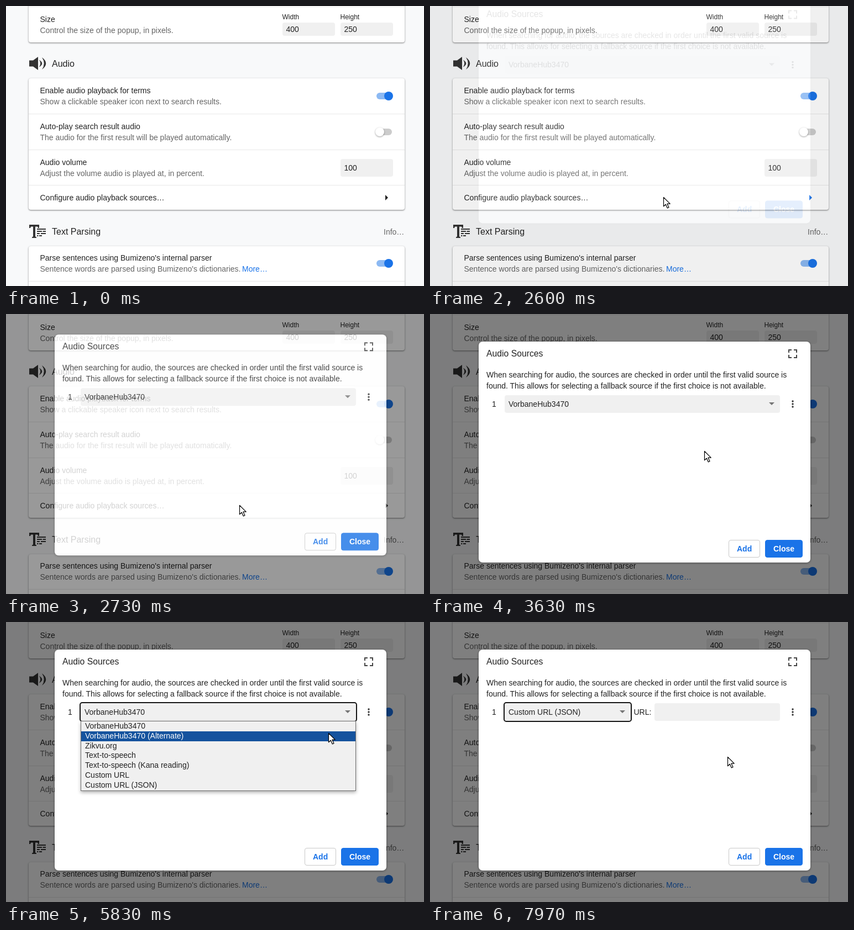
Recreate the animation shown at these times as an HTML page. Size 756 by 507 pixels, loop 8 s.

```html
<!DOCTYPE html>
<html lang="en">
<head>
<meta charset="utf-8">
<title>Audio settings</title>
<style>
html, body { margin: 0; width: 100%; height: 100%; overflow: hidden; background: #f8f9fa; }
body { position: relative; font: 14px/20px "Liberation Sans", Arial, sans-serif; color: #222; }
div, span, svg { position: absolute; box-sizing: border-box; }
.layer, svg.layer { left: 0; top: 0; width: 756px; height: 507px; overflow: hidden; }
span { white-space: pre; }
.soft { color: #666; }
.link { color: #1a73e8; }
.small { font-size: 12px; line-height: 22px; }
.head { font-size: 16px; line-height: 19px; }
.title { font-size: 15.75px; line-height: 19px; }
.bold { font-weight: bold; color: #1a73e8; }
.white { color: #fff; }
.card { background: #fff; border-radius: 4px; box-shadow: 0 1px 2px rgba(0,0,0,.35), 0 1px 3px 1px rgba(0,0,0,.13); }
.line { background: #e8e8e8; }
.field { background: #f0f0f0; border-radius: 4px; }
.track { border-radius: 6px; background: #ccc; }
.knob { border-radius: 50%; background: #fff; box-shadow: 0 1px 3px rgba(0,0,0,.4); }
.on.track { background: #8cb9f3; }
.on.knob { background: #1a73e8; box-shadow: none; }
.ring { border: 2px solid #151515; border-radius: 5px; }
.panel { background: #fff; border-radius: 7px; box-shadow: 0 1px 4px rgba(0,0,0,.4); }
.button { border: 1px solid #c8c8c8; border-radius: 4px; }
.main { background: #1a73e8; border-color: #1a73e8; }
.popup { background: #f0f0f0; border: 1px solid #6e6e6e; box-shadow: 0 3px 6px rgba(0,0,0,.3); }

#modal, #dialog, #wide, #narrow, #list, #hot, #chevron, #cursor, #arrow, #hand { animation: 8s linear infinite; }
#modal { background: rgba(0,0,0,.5); animation-name: fade; }
#dialog { overflow: visible; animation-name: drop; }
#chevron { fill: #222; animation-name: tint; }
#wide, #narrow, #list, #hot, #arrow, #hand { animation-timing-function: step-end; }
#wide { animation-name: wide; }
#narrow { animation-name: narrow; }
#list { animation-name: list; }
#hot { background: #15539e; color: #fff; animation-name: hot; }
#cursor { left: 0; top: 0; width: 1px; height: 1px; animation-name: move; }
#cursor svg { left: 0; top: 0; width: 20px; height: 22px; overflow: visible; }
#arrow { animation-name: arrow; }
#hand { animation-name: hand; }

@keyframes fade {
  0%, 31.75% { opacity: 0; animation-timing-function: cubic-bezier(.35,0,.35,1); }
  35.875%, 100% { opacity: 1; }
}
@keyframes drop {
  0%, 31.75% { transform: translateY(-64px); animation-timing-function: cubic-bezier(.35,0,.35,1); }
  35.875%, 100% { transform: none; }
}
@keyframes tint {
  0%, 14.7% { fill: #222; }
  16.5%, 32.55% { fill: #1a73e8; }
  33.8%, 100% { fill: #222; }
}
@keyframes wide { 0% { visibility: visible; } 92.84%, 100% { visibility: hidden; } }
@keyframes narrow { 0% { visibility: hidden; } 92.84%, 100% { visibility: visible; } }
@keyframes list { 0% { visibility: hidden; } 62.45% { visibility: visible; } 92.84%, 100% { visibility: hidden; } }
@keyframes hot {
  0% { clip-path: inset(180px 124px 309px 136px); }
  71.7% { clip-path: inset(198px 124px 291px 136px); }
  76.1% { clip-path: inset(216px 124px 274px 136px); }
  80.33%, 100% { clip-path: inset(287px 124px 202px 136px); }
}
@keyframes arrow {
  0% { visibility: hidden; }
  5.34% { visibility: visible; }
  14.55% { visibility: hidden; }
  29.96%, 100% { visibility: visible; }
}
@keyframes hand { 0% { visibility: hidden; } 14.55% { visibility: visible; } 29.96%, 100% { visibility: hidden; } }
@keyframes move {
  0%, 5.3% { transform: translate(748px, 58px); animation-timing-function: cubic-bezier(.2,.3,.5,1); }
  10.8%, 14.54% { transform: translate(516px, 175px); }
  14.55%, 14.65% { transform: translate(464px, 331px); animation-timing-function: ease-out; }
  17.5% { transform: translate(441px, 354px); }
  19.6%, 21.25% { transform: translate(434px, 351px); }
  24% { transform: translate(427px, 339px); }
  26.6%, 40.5% { transform: translate(422px, 346px); animation-timing-function: ease-in-out; }
  45.3%, 47.5% { transform: translate(496px, 248px); animation-timing-function: ease-out; }
  49.1%, 50.5% { transform: translate(588px, 155px); animation-timing-function: ease-out; }
  55.3%, 68.75% { transform: translate(620px, 157px); animation-timing-function: ease-in-out; }
  72.8%, 75% { transform: translate(583px, 201px); }
  76.6%, 80.32% { transform: translate(581px, 224px); }
  80.33%, 84.25% { transform: translate(521px, 285px); }
  88.7%, 95.5% { transform: translate(518px, 290px); animation-timing-function: ease-in-out; }
  99.6%, 100% { transform: translate(538px, 244px); }
}
</style>
</head>
<body>
<div id="page" class="layer"></div>
<svg class="layer" viewBox="0 0 756 507" fill="#333">
  <path d="M42 98.5h7l9-6.5v24l-9-6.5h-7z"/>
  <path d="M60 97.5q10.500 6.500 0 13q4.500-6.500 0-13z"/>
  <path d="M65 93q14.500 11 0 22q7.500-11 0-22z"/>
  <path d="M42 396h18v6h-2l-1-2.500h-4v18l2 1v1.500h-8v-1.500l2-1v-18h-4l-1 2.500h-2z"/>
  <path d="M56 404h16M56 408h9m1.500 0h5.500M56 412h5m2 0h9M56 416h2.500m1.500 0h5" stroke="#333" stroke-width="1.800"/>
  <path id="chevron" d="M686 342l5 5-5 5z"/>
</svg>
<div id="modal" class="layer">
  <div id="dialog" class="layer">
    <div id="base" class="layer"></div>
    <div id="wide" class="layer"></div>
    <div id="narrow" class="layer"></div>
    <svg class="layer" viewBox="0 0 756 507" fill="#333">
      <path d="M649 70v-5h5m4 0h5v5m0 4v5h-5m-4 0h-5v-5" fill="none" stroke="#444" stroke-width="2"/>
      <circle cx="656" cy="158" r="1.700"/><circle cx="656" cy="163" r="1.700"/><circle cx="656" cy="168" r="1.700"/>
    </svg>
  </div>
</div>
<div id="list" class="layer"></div>
<div id="hotwrap" class="layer"></div>
<div id="cursor">
  <svg id="arrow"><path d="M.5.5v16.300l3.800-3.600 3 6.700 2.700-1.200-3-6.500h5.200z" fill="#fff" stroke="#000" stroke-width="1.200" stroke-linejoin="round"/></svg>
  <svg id="hand">
    <path d="M-.5 10V1.800Q-.5.500 .9.500T2.300 1.800V6q1.200-1 2.500.2 1.300-.9 2.500.4 1.800-.6 2.800 1.200V12q0 2-1.300 3.500v1.500H-.8v-1.300L-4.200 10.500Q-5 9-3.800 8.200-2.500 7.700-.5 10z" fill="#fff" stroke="#000" stroke-width="1.200" stroke-linejoin="round"/>
    <path d="M1.500 9.500v1m2.500-1v1m2.500-1v1" stroke="#000"/>
  </svg>
</div>
<script>
const $ = id => document.getElementById(id);

function add(parent, tag, cls, x, y) {
  const el = document.createElement(tag);
  el.className = cls;
  el.style.left = x + 'px';
  el.style.top = y + 'px';
  parent.append(el);
  return el;
}

// y is the baseline; every text class puts it 15px below the top
function text(parent, x, y, str, cls = '') {
  add(parent, 'span', cls, x, y - 15).textContent = str;
}

function box(parent, x, y, w, h, cls) {
  const el = add(parent, 'div', cls, x, y);
  el.style.width = w + 'px';
  el.style.height = h + 'px';
}

function row(y, title, note) {
  text(page, 61.5, y, title);
  if (note) text(page, 61.5, y + 20, note, 'soft');
}

function toggle(y, on) {
  const cls = on ? ' on' : '';
  box(page, 670, y - 6, 28, 12, 'track' + cls);
  box(page, on ? 684 : 668, y - 8, 16, 16, 'knob' + cls);
}

function select(parent, w, value) {
  box(parent, 135, 147, w, 32, 'field');
  text(parent, 142, 168, value);
  const mark = add(parent, 'div', '', 135 + w - 20, 160);
  mark.style.cssText += 'border:5px solid transparent;border-top-color:#757575;border-bottom:0';
}

const page = $('page'), base = $('base'), list = $('list');

box(page, 41, -30, 680, 96, 'card');
box(page, 41, 131, 680, 238, 'card');
box(page, 41, 435, 680, 100, 'card');
for (const y of [1, 195, 260, 324, 498]) box(page, 41, y, 680, 1, 'line');

row(29, 'Size', 'Control the size of the popup, in pixels.');
[['Width', '400', 500], ['Height', '250', 605]].forEach(([name, value, x]) => {
  text(page, x - .5, 24, name, 'small');
  box(page, x, 30, 95, 24, 'field');
  text(page, x + 6.5, 47, value);
});

text(page, 83, 110, 'Audio', 'head');
row(158, 'Enable audio playback for terms', 'Show a clickable speaker icon next to search results.');
row(223, 'Auto-play search result audio', 'The audio for the first result will be played automatically.');
row(288, 'Audio volume', 'Adjust the volume audio is played at, in percent.');
row(352, 'Configure audio playback sources…');
box(page, 605, 277, 95, 32, 'field');
text(page, 611.5, 298, '100');

text(page, 83, 414, 'Text Parsing', 'head');
text(page, 683, 414, 'Info…', 'soft');
row(461, "Parse sentences using Bumizeno's internal parser", "Sentence words are parsed using Bumizeno's dictionaries.");
text(page, 427, 481, 'More…', 'link');
toggle(163, true);
toggle(228, false);
toggle(466, true);

box(base, 88, 50, 600, 400, 'panel');
text(base, 102, 77, 'Audio Sources', 'title');
text(base, 102, 115, 'When searching for audio, the sources are checked in order until the first valid source is');
text(base, 102, 135, 'found. This allows for selecting a fallback source if the first choice is not available.');
text(base, 112, 168, '1');
box(base, 540, 409, 57, 32, 'button');
text(base, 555, 430, 'Add', 'bold');
box(base, 606, 409, 68, 32, 'button main');
text(base, 621, 430, 'Close', 'bold white');

const options = ['VorbaneHub3470', 'VorbaneHub3470 (Alternate)', 'Zikvu.org', 'Text-to-speech',
  'Text-to-speech (Kana reading)', 'Custom URL', 'Custom URL (JSON)'];

select($('wide'), 498, options[0]);
select($('narrow'), 228, options[6]);
box($('narrow'), 133, 145, 232, 36, 'ring');
text($('narrow'), 368.5, 168, 'URL:');
box($('narrow'), 406, 147, 227, 32, 'field');

// open list: plain rows, then a highlighted copy clipped to one row
box(list, 133, 145, 502, 36, 'ring');
box(list, 135, 179, 498, 127, 'popup');
const hot = add(list, 'div', 'layer', 0, 0);
hot.id = 'hot';
options.forEach((name, i) => {
  const y = Math.round(180 + 17.8 * i) + 13;
  text(list, 143, y, name);
  text(hot, 143, y, name);
});
list.append(hot);
$('hotwrap').remove();
</script>
</body>
</html>
```
